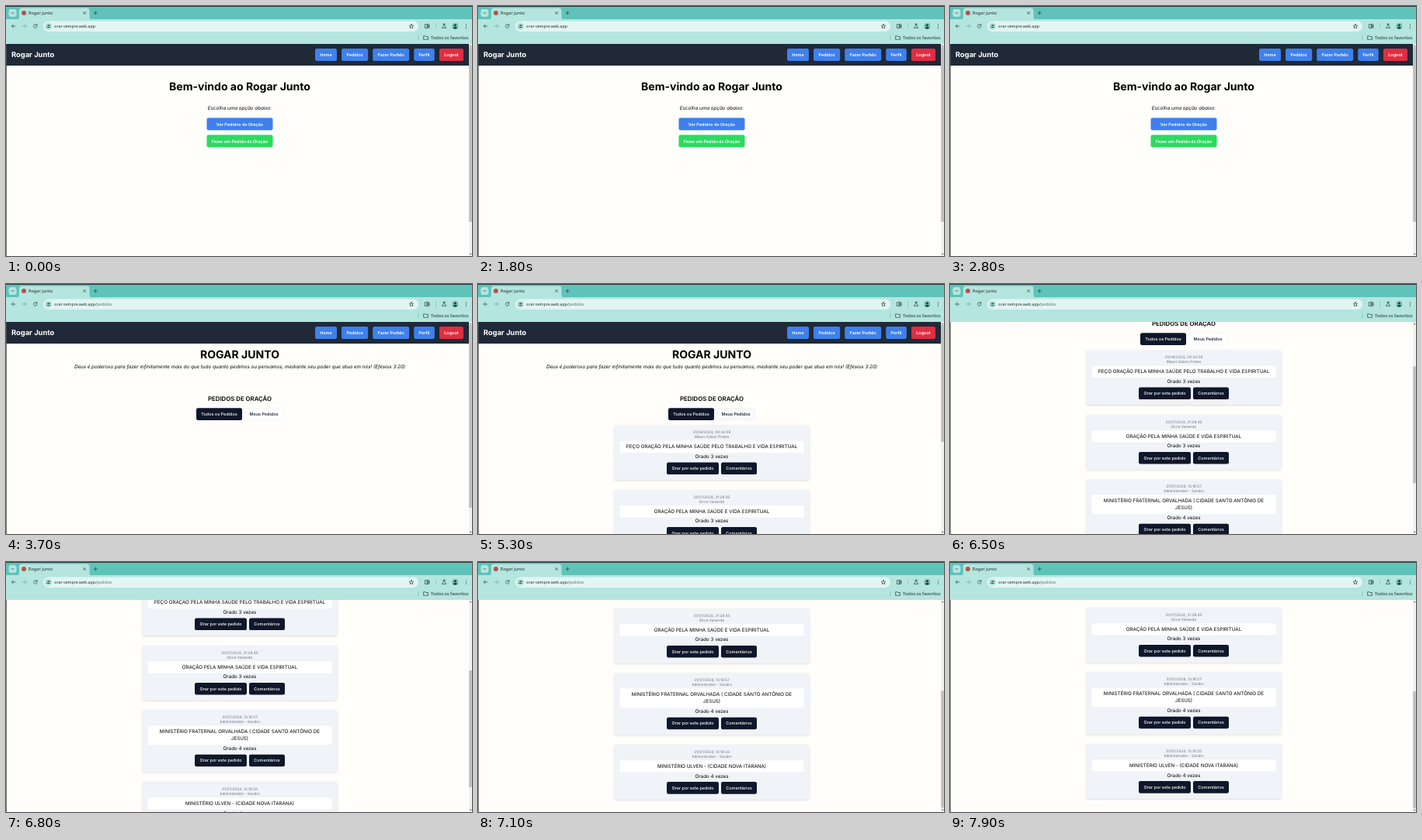
Write an HTML page that moves like this. It is 600 px wide and 323 px high and loops after 8000 ms.

```html
<!DOCTYPE html>
<html lang="pt-BR">
<head>
<meta charset="utf-8">
<title>Rogar Junto</title>
<style>
@property --y { syntax: "<number>"; inherits: true; initial-value: 0; }
html, body { margin: 0; width: 100%; height: 100%; overflow: hidden; background: #fffefb; }
svg { display: block; width: 100vw; height: 100vh; animation: scroll 8s -8ms infinite; }
text { font-family: Inter, sans-serif; text-rendering: geometricPrecision; white-space: pre; }
.mid { text-anchor: middle; }
.ui text { font-family: "Noto Sans", sans-serif; fill: #1d2b2a; }
.ui .path { fill: #5c706d; }
.line { fill: none; stroke: #28403d; stroke-width: .7; stroke-linecap: round; stroke-linejoin: round; }

#page { transform: translateY(calc(var(--y) * -1px)); }
#thumb { transform: translateY(calc(var(--y) * .551px)); animation: thumb 8s -8ms step-end infinite; }
#home { animation: home 8s -8ms step-end infinite; }
#list, .path { animation: list 8s -8ms step-end infinite; }
#cards { animation: cards 8s -8ms step-end infinite; }
#mine { animation: hover 8s -8ms step-end infinite; }

/* one step every 100 ms = 1.25% */
@keyframes scroll {
  0%, 71.25% { --y: 0; animation-timing-function: step-end; }
  72.5% { --y: 12; animation-timing-function: step-end; }
  73.75% { --y: 33.5; animation-timing-function: step-end; }
  75% { --y: 48; animation-timing-function: step-end; }
  76.25% { --y: 53; animation-timing-function: step-end; }
  78.75% { --y: 62; animation-timing-function: steps(2); }
  81.25% { --y: 97; animation-timing-function: steps(3); }
  85% { --y: 158; animation-timing-function: steps(2); }
  87.5% { --y: 198; animation-timing-function: step-end; }
  88.75% { --y: 206; animation-timing-function: step-end; }
  90%, 100% { --y: 207; animation-timing-function: step-end; }
}
@keyframes thumb {
  0% { height: 226px; }
  46.25% { height: 236px; }
  56.25%, 100% { height: 151px; }
}
@keyframes home { 0% { visibility: visible; } 46.25%, 100% { visibility: hidden; } }
@keyframes list { 0% { visibility: hidden; } 46.25%, 100% { visibility: visible; } }
@keyframes cards { 0% { visibility: hidden; } 56.25%, 100% { visibility: visible; } }
@keyframes hover {
  0% { fill: #fff; }
  66.25% { fill: #f7f9fb; }
  67.5% { fill: #f0f4f8; }
  76.25%, 100% { fill: #fff; }
}
</style>
</head>
<body>
<svg viewBox="0 0 600 323" preserveAspectRatio="none">
  <defs>
    <clipPath id="view"><rect y="49" width="596" height="274"/></clipPath>
    <filter id="shade" x="-5%" y="-10%" width="110%" height="130%">
      <feDropShadow dx="0" dy=".9" stdDeviation=".9" flood-color="#334" flood-opacity=".2"/>
    </filter>
  </defs>
  <rect width="600" height="323" fill="#fffefb"/>

  <g clip-path="url(#view)">
    <g id="page">
      <g id="nav"></g>
      <g id="home"></g>
      <g id="list"></g>
      <g id="cards"></g>
    </g>
  </g>

  <rect x="596" y="49" width="4" height="274" fill="#f1f1f0"/>
  <rect id="thumb" x="596.2" y="53" width="3.6" height="226" fill="#bebfbe"/>
  <path d="M596.8 52.2l1.3-1.6 1.3 1.6zM596.8 319.8l1.3 1.6 1.3-1.6z" fill="#555"/>
  <rect y="49" width=".8" height="274" fill="#4a5050"/>

  <g class="ui">
    <rect width="600" height="18" fill="#5fc3ba"/>
    <rect width="600" height="1" fill="#2a3635"/>
    <rect y="17" width="600" height="32" fill="#b5e5df"/>
    <rect x="3.5" y="4" width="10" height="10" rx="3" fill="#b5e5df"/>
    <path class="line" d="M7 8.3l1.6 1.6 1.6-1.6"/>
    <path d="M14 17.2q3 0 3-3V6q0-3.5 3.5-3.5h83.5q3.5 0 3.5 3.5v8.2q0 3 3 3z" fill="#b5e5df"/>
    <circle cx="23" cy="9" r="3" fill="#b0574d"/>
    <text x="29" y="11" font-size="5.6">Rogar Junto</text>
    <path class="line" d="M99.7 7.5l3 3m0-3l-3 3M113.2 9h4.2m-2.1-2.1v4.2"/>

    <path class="line" d="M12 26H7.5m2-2.1L7.4 26l2.1 2.1"/>
    <path class="line" d="M21.5 26H26m-2-2.1l2.1 2.1-2.1 2.1" opacity=".45"/>
    <path class="line" d="M39.7 24.6a2.3 2.3 0 1 0 .4 1.9M40 23.5v1.5h-1.5"/>
    <rect x="48" y="19.5" width="483" height="13.5" rx="6.7" fill="#e2f5f2"/>
    <circle cx="54.7" cy="26.2" r="4.7" fill="#b5e5df"/>
    <path class="line" d="M52.7 25h1.6m1.5 0h1M52.7 27.5h1m1.5 0h1.6"/>
    <circle class="line" cx="55.1" cy="25" r=".6"/>
    <circle class="line" cx="54.4" cy="27.5" r=".6"/>
    <text x="62.3" y="27.8" font-size="5.2">orar-sempre.web.app<tspan class="path">/pedidos</tspan></text>
    <path class="line" d="M522 23.3l.8 1.9 2 .2-1.5 1.3.5 2-1.8-1.1-1.8 1.1.5-2-1.5-1.3 2-.2z"/>
    <path class="line" d="M539.8 23.7h5v4.6h-5zm2.5 0v4.6m0-3.1h2.5m-2.5 1.5h2.5"/>
    <path class="line" d="M563 23.3h2.4m-1.9 0v1.9l-1.9 3.2h5.2l-1.9-3.2v-1.9"/>
    <circle cx="578.3" cy="26" r="4" fill="#6fbdb4"/>
    <circle cx="578.3" cy="24.8" r="1.5" fill="#1c403d"/>
    <path d="M575.4 28.3q2.9-3 5.8 0-2.9 2.8-5.8 0z" fill="#1c403d"/>
    <g fill="#28403d">
      <circle cx="592.5" cy="23.8" r=".6"/>
      <circle cx="592.5" cy="26" r=".6"/>
      <circle cx="592.5" cy="28.2" r=".6"/>
    </g>
    <path d="M531 37.5v7M553.5 22.5v7" stroke="#7fc9c1" stroke-width=".8"/>
    <path class="line" d="M538 38.7h2l.7.8h2.8v3.7H538z"/>
    <text x="547" y="42.8" font-size="5.7">Todos os favoritos</text>
  </g>
</svg>

<script>
const BLUE = "#3f80ec", RED = "#df2e42", GREEN = "#2cdb60", INK = "#0f172a";
const MID = 301;

const text = (x, y, size, str, attrs = "") =>
  `<text class="mid" x="${x}" y="${y}" font-size="${size}" ${attrs}>${str}</text>`;

const box = (x, y, w, h, fill, attrs = "") =>
  `<rect x="${x}" y="${y}" width="${w}" height="${h}" rx="2.2" fill="${fill}" ${attrs}/>`;

const button = (x, y, w, h, fill, label, weight = 600) =>
  box(x, y, w, h, fill) +
  text(x + w / 2, y + h / 2 + 2, 5.47, label, `fill="#fff" font-weight="${weight}"`);

const put = (id, ...parts) => document.getElementById(id).innerHTML = parts.join("");

put("nav",
  `<rect y="49" width="596" height="28" fill="#1f2937"/>`,
  `<text x="7" y="66.2" font-size="9.375" font-weight="700" fill="#fff">Rogar Junto</text>`,
  button(398, 55, 28, 16, BLUE, "Home"),
  button(432, 55, 34.2, 16, BLUE, "Pedidos"),
  button(472.2, 55, 47, 16, BLUE, "Fazer Pedido"),
  button(525.3, 55, 26.5, 16, BLUE, "Perfil"),
  button(558, 55, 31, 16, RED, "Logout"));

put("home",
  text(MID, 109, 14.06, "Bem-vindo ao Rogar Junto", `font-weight="700"`),
  text(MID, 134.4, 6.25, "Escolha uma opção abaixo:", `font-style="italic"`),
  button(258.5, 144.5, 85, 16, BLUE, "Ver Pedidos de Oração"),
  button(258.5, 166.5, 85, 16, GREEN, "Fazer um Pedido de Oração"));

put("list",
  text(MID, 96.3, 14.06, "ROGAR JUNTO", `font-weight="700"`),
  text(MID, 109.2, 6.25, "Deus é poderoso para fazer infinitamente mais do que tudo quanto pedimos ou pensamos, mediante seu poder que atua em nós! (Efésios 3:20)", `font-style="italic"`),
  text(MID, 151, 7.81, "PEDIDOS DE ORAÇÃO", `font-weight="600"`),
  button(245, 160.2, 59, 15.8, INK, "Todos os Pedidos", 500),
  box(307, 160.4, 50, 15.4, "#fff", `id="mine" stroke="#e4e9ef" stroke-width=".4"`),
  text(332, 170.1, 5.47, "Meus Pedidos", `font-weight="500" fill="${INK}"`));

const LINE = 9.375;
const requests = [
  ["01/08/2024, 09:34:08", "Mauro Edson Prates", 3,
    ["PEÇO ORAÇÃO PELA MINHA SAÚDE PELO TRABALHO E VIDA ESPIRITUAL"]],
  ["31/07/2024, 21:28:45", "Dirce Valverde", 3,
    ["ORAÇÃO PELA MINHA SAÚDE E VIDA ESPIRITUAL"]],
  ["31/07/2024, 13:18:57", "Administrador - Sandro", 4,
    ["MINISTÉRIO FRATERNAL ORVALHADA ( CIDADE SANTO ANTÔNIO DE", "JESUS)"]],
  ["31/07/2024, 13:18:33", "Administrador - Sandro", 4,
    ["MINISTÉRIO ULVEN - (CIDADE NOVA ITARANA)"]],
];

let nextY = 182.5;
function card([date, name, count, lines]) {
  const y = nextY, extra = (lines.length - 1) * LINE, low = y + extra;
  nextY += 83.4 + extra;
  return box(175.5, y, 251, 70.6 + extra, "#f0f3f7", `filter="url(#shade)"`) +
    text(MID, y + 10.8, 4.69, date, `fill="#6b7280"`) +
    text(MID, y + 16.8, 4.69, name, `fill="#6b7280"`) +
    box(182, y + 19.8, 238, 16.2 + extra, "#fff", `stroke="#e6eaef" stroke-width=".4"`) +
    lines.map((str, i) => text(MID, y + 29.7 + i * LINE, 6.25, str)).join("") +
    text(MID, low + 42.5, 6.25, `Orado ${count} vezes`) +
    button(243, low + 48, 67, 15.6, INK, "Orar por este pedido", 500) +
    button(313, low + 48, 46, 15.6, INK, "Comentários", 500);
}
put("cards", ...requests.map(card));
</script>
</body>
</html>
```
